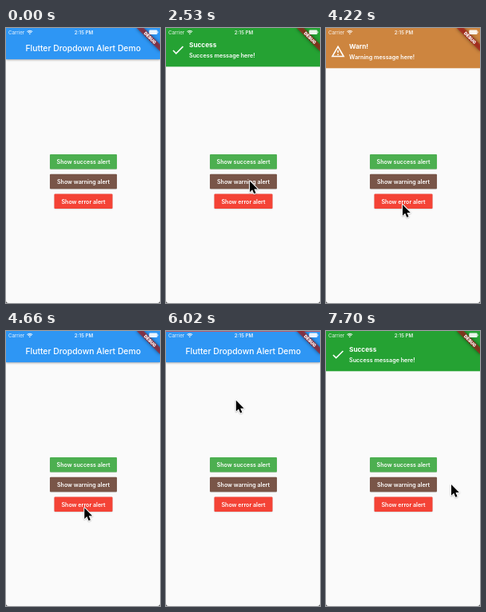
Write an HTML page with a canvas that moves like this. It is 193 by 344 pixels and loops after 7.99 s.

```html
<!DOCTYPE html>
<html lang="en">
<head>
<meta charset="utf-8">
<title>Dropdown alert demo</title>
<style>
html, body { margin: 0; width: 100%; height: 100%; overflow: hidden; background: #fafafa; }
canvas { display: block; width: 193px; height: 344px; }
</style>
</head>
<body>
<canvas id="stage"></canvas>
<script>
const W = 193, H = 344, LOOP = 7990, U = W / 375;
const canvas = document.getElementById('stage');
const ctx = canvas.getContext('2d');
const dpr = window.devicePixelRatio || 1;
canvas.width = W * dpr;
canvas.height = H * dpr;

const ALERT_H = 50.3, SLIDE_IN = 150, SLIDE_OUT = 290;

const KINDS = {
  success: { color: '#25a233', title: 'Success', body: 'Success message here!', icon: checkIcon },
  warn: { color: '#cd853f', title: 'Warn!', body: 'Warning message here!', icon: warnIcon },
  error: { color: '#f44336', title: 'Error', body: 'Error message here!', icon: errorIcon }
};

const ALERTS = [
  { kind: KINDS.success, show: 1158, hide: 2520 },
  { kind: KINDS.warn, show: 2985, hide: 4360 },
  { kind: KINDS.error, show: 4920, hide: 5735 },
  { kind: KINDS.success, show: 6713, hide: Infinity }
];

const BUTTONS = [
  { label: 'Show success alert', color: '#4caf50', x: 55, w: 84, y: 158 },
  { label: 'Show warning alert', color: '#795548', x: 55, w: 84, y: 182.7 },
  { label: 'Show error alert', color: '#f44336', x: 60.5, w: 73, y: 207.5 }
];

// Pointer moves: start, end, target x, target y
const START = [150, 346];
const MOVES = [
  [360, 1120, 110, 166],
  [1300, 1480, 113.5, 171.5],
  [1810, 2350, 105, 191.5],
  [3200, 3740, 95.5, 221],
  [3830, 3890, 96, 221],
  [4220, 4400, 98.3, 221.3],
  [5220, 5560, 77, 29.5],
  [5740, 6330, 102, 162],
  [6480, 6700, 102.3, 176.3],
  [7180, 7700, 157, 192]
];

const clamp = v => Math.min(1, Math.max(0, v));
const ease = v => v < 0.5 ? 4 * v ** 3 : 1 - 4 * (1 - v) ** 3;

function text(str, x, y, size, weight, align = 'left') {
  ctx.font = `${weight} ${size}px Inter, Roboto, sans-serif`;
  ctx.textAlign = align;
  ctx.textBaseline = 'alphabetic';
  ctx.fillStyle = '#fff';
  ctx.fillText(str, x, y);
}

function rect(x, y, w, h, color) {
  ctx.fillStyle = color;
  ctx.fillRect(x, y, w, h);
}

function shadow(color, blur, dy) {
  ctx.shadowColor = color;
  ctx.shadowBlur = blur * dpr;
  ctx.shadowOffsetY = dy * dpr;
}

function poly(points) {
  ctx.beginPath();
  points.forEach(([x, y]) => ctx.lineTo(x, y));
}

function checkIcon() {
  poly([[9, 16.17], [4.83, 12], [3.41, 13.41], [9, 19], [21, 7], [19.59, 5.59]]);
  ctx.fill();
}

function warnIcon() {
  poly([[12, 4], [21.27, 20], [2.73, 20]]);
  ctx.closePath();
  ctx.stroke();
  ctx.fillRect(11, 10, 2, 4);
  ctx.fillRect(11, 16, 2, 2);
}

function errorIcon() {
  ctx.beginPath();
  ctx.arc(12, 12, 9, 0, 7);
  ctx.stroke();
  ctx.fillRect(11, 7, 2, 6);
  ctx.fillRect(11, 15, 2, 2);
}

function drawPage() {
  rect(0, 0, W, H, '#fafafa');
  ctx.save();
  shadow('rgba(0,0,0,.35)', 2.5, 1);
  rect(0, 0, W, 76 * U, '#2e96f4');
  ctx.restore();
  text('Flutter Dropdown Alert Demo', W / 2 + 0.2, 28.8, 20.2 * U, 500, 'center');

  for (const b of BUTTONS) {
    ctx.save();
    shadow('rgba(0,0,0,.2)', 1.2, 0.6);
    ctx.fillStyle = b.color;
    ctx.beginPath();
    ctx.roundRect(b.x, b.y, b.w, 18.5, 1);
    ctx.fill();
    ctx.restore();
    text(b.label, b.x + b.w / 2, b.y + 12, 13.8 * U, 600, 'center');
  }
}

function drawAlert({ kind, show, hide }, t) {
  const shown = clamp((t - show) / SLIDE_IN) - clamp((t - hide) / SLIDE_OUT);
  if (shown <= 0) return;
  ctx.save();
  ctx.translate(0, (shown - 1) * ALERT_H);
  rect(0, 0, W, ALERT_H, kind.color);
  text(kind.title, 29, 26.2, 16 * U, 700);
  text(kind.body, 29, 38.5, 14 * U, 600);
  ctx.translate(15, 29.4);
  ctx.scale(0.77, 0.77);
  ctx.translate(-12, -12);
  ctx.strokeStyle = '#fff';
  ctx.lineWidth = 2;
  kind.icon();
  ctx.restore();
}

function drawBanner() {
  ctx.save();
  ctx.translate(W, 0);
  ctx.rotate(Math.PI / 4);
  ctx.scale(U, U);
  ctx.filter = `blur(${4 * U * dpr}px)`;
  rect(-40, 28, 80, 12, 'rgba(0,0,0,.5)');
  ctx.filter = 'none';
  rect(-40, 28, 80, 12, 'rgba(183,28,28,.63)');
  text('DEBUG', 0, 37.7, 10.6, 900, 'center');
  ctx.restore();
}

function drawStatusBar() {
  ctx.save();
  ctx.globalAlpha = 0.9;
  text('Carrier', 3, 7.7, 12 * U, 400);
  text('2:15 PM', W / 2 + 1, 7.7, 12 * U, 600, 'center');

  ctx.strokeStyle = '#fff';
  ctx.lineWidth = 1.1;
  for (const r of [2.9, 4.7]) {
    ctx.beginPath();
    ctx.arc(29.8, 8, r, -Math.PI * 0.75, -Math.PI * 0.25);
    ctx.stroke();
  }
  ctx.beginPath();
  ctx.moveTo(29.8, 8.2);
  ctx.arc(29.8, 8.2, 1.6, -Math.PI * 0.75, -Math.PI * 0.25);
  ctx.fill();

  ctx.beginPath();
  ctx.roundRect(179.3, 2.6, 10.4, 5.4, 1.3);
  ctx.fill();
  ctx.fillRect(190.2, 4.4, 0.7, 1.8);
  ctx.restore();
}

function drawCorners() {
  const r = 3;
  ctx.fillStyle = '#444';
  for (const [x, dir] of [[0, 1], [W, -1]]) {
    ctx.beginPath();
    ctx.moveTo(x, H);
    ctx.lineTo(x, H - r);
    ctx.quadraticCurveTo(x, H, x + dir * r, H);
    ctx.fill();
  }
}

function pointerAt(t) {
  let [x, y] = START;
  for (const [from, to, tx, ty] of MOVES) {
    const k = ease(clamp((t - from) / (to - from)));
    x += (tx - x) * k;
    y += (ty - y) * k;
  }
  return [x, y];
}

function drawPointer(t) {
  if (t < MOVES[0][0]) return;
  ctx.save();
  ctx.translate(...pointerAt(t));
  ctx.scale(0.88, 0.88);
  poly([[0, 0], [0, 15.5], [3.6, 12.2], [6, 18], [8.6, 17], [6.2, 11.3], [11.2, 11.3]]);
  ctx.closePath();
  ctx.strokeStyle = '#fff';
  ctx.lineWidth = 2.2;
  ctx.lineJoin = 'round';
  shadow('rgba(0,0,0,.3)', 1.5, 0.6);
  ctx.stroke();
  shadow('transparent', 0, 0);
  ctx.fillStyle = '#000';
  ctx.fill();
  ctx.restore();
}

function draw(t) {
  ctx.setTransform(dpr, 0, 0, dpr, 0, 0);
  drawPage();
  ALERTS.forEach(a => drawAlert(a, t));
  drawBanner();
  drawStatusBar();
  drawCorners();
  drawPointer(t);
}

const origin = performance.now();
function tick() {
  draw((performance.now() - origin) % LOOP);
  requestAnimationFrame(tick);
}
tick();
</script>
</body>
</html>
```
